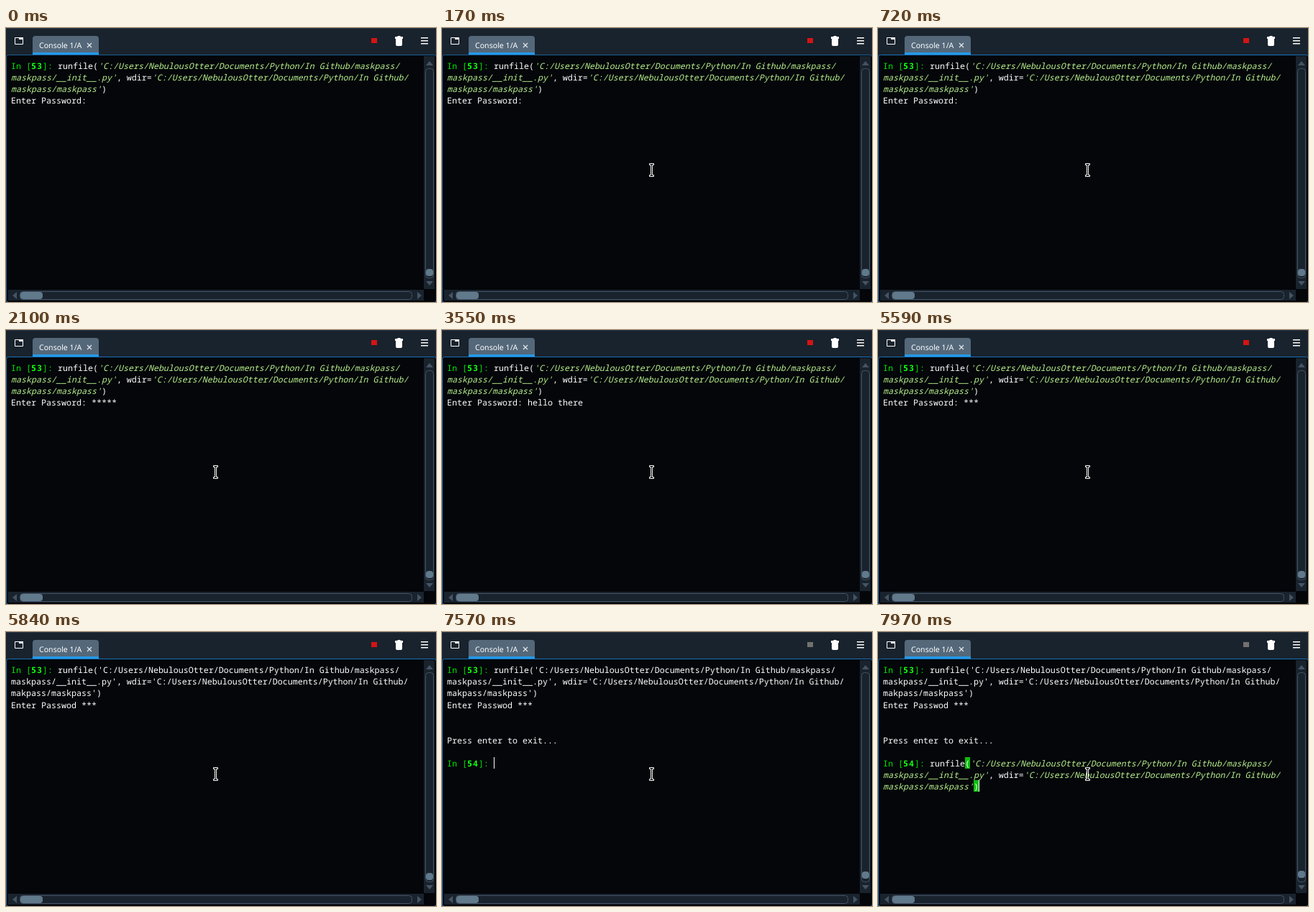
These frames come from a looping animation (598x381 px, 8000 ms). An HTML page:

```html
<!DOCTYPE html>
<html lang="en">
<head>
<meta charset="utf-8">
<title>Masked password console</title>
<style>
  html, body { margin: 0; width: 100%; height: 100%; overflow: hidden; background: #19232d; }
  svg { display: block; width: 598px; height: 381px; }
  text {
    font: 500 11.667px "Noto Sans Mono", "DejaVu Sans Mono", monospace;
    fill: #fff; white-space: pre; text-rendering: geometricPrecision;
  }
  .tab { font: 10.6px "Noto Sans", "Open Sans", sans-serif; }
  .in { fill: #00e600; }
  .num { fill: #1f1; font-weight: 700; letter-spacing: 1px; }
  .str { fill: var(--str, #fff); font-style: var(--slant, normal); }
  .lit { --str: #b8f08c; --slant: italic; }
  .bar { fill: #19232d; }
  .groove { fill: #19232d; stroke: #455364; }
  .arrow { fill: #455364; }
  .thumb { fill: #60798b; }

  /* One loop is 8000 ms, so 1% is 80 ms; every change is a hard step. */
  .a { animation: 8s step-end infinite; }
  #frame { animation-name: frame; }
  #first { animation-name: first; }
  #prompt { animation-name: prompt; }
  #mask { animation-name: mask; }
  #cover { animation-name: cover; }
  #clear { animation-name: clear; }
  #plain { animation-name: plain; }
  #broken { animation-name: broken; }
  #exit { animation-name: exit; }
  #next { animation-name: next; }
  #paste { animation-name: paste; }
  #caret { animation-name: caret; }
  #stop { animation-name: stop; }
  #thumb { animation-name: thumb; }
  #ring { animation-name: ring; }
  #mouse { animation-name: mouse; }

  @keyframes frame { 0% { stroke: #1b5f98; } 9%, 100% { stroke: #1a72bb; } }
  @keyframes first { 0% { opacity: 1; } 73%, 100% { opacity: 0; } }
  @keyframes prompt { 0% { opacity: 1; } 71.125%, 100% { opacity: 0; } }
  @keyframes mask {
    0%, 50.625%, 61.625% { opacity: 1; }
    44.375%, 57.5%, 71.125%, 100% { opacity: 0; }
  }
  @keyframes cover {
    0% { transform: none; }
    18.125% { transform: translateX(7px); }
    19.375% { transform: translateX(14px); }
    22.75% { transform: translateX(21px); }
    23.75% { transform: translateX(28px); }
    26.25% { transform: translateX(35px); }
    29.375% { transform: translateX(42px); }
    31.875% { transform: translateX(49px); }
    33.125% { transform: translateX(56px); }
    35% { transform: translateX(63px); }
    36.25% { transform: translateX(77px); }
    63.25% { transform: translateX(70px); }
    69.875%, 100% { transform: translateX(21px); }
  }
  @keyframes clear {
    0%, 50.625%, 61.625%, 100% { opacity: 0; }
    44.375%, 57.5% { opacity: 1; }
  }
  @keyframes plain { 0% { opacity: 0; } 73%, 100% { opacity: 1; } }
  @keyframes broken {
    0% { opacity: 0; transform: translateY(-1px); }
    71.125% { opacity: 1; transform: translateY(-1px); }
    73%, 100% { opacity: 1; transform: none; }
  }
  @keyframes exit { 0% { opacity: 0; } 85.375%, 100% { opacity: 1; } }
  @keyframes next { 0% { opacity: 0; } 94.625%, 100% { opacity: 1; } }
  @keyframes paste { 0% { opacity: 0; } 99.625%, 100% { opacity: 1; } }
  @keyframes caret {
    0%, 91.5% { opacity: 0; transform: none; }
    85.375% { opacity: 1; transform: translate(161px, 142px); }
    94.625% { opacity: 1; transform: translate(72px, 174px); }
    99.625%, 100% { opacity: 1; transform: translate(140px, 206px); }
  }
  @keyframes stop { 0% { fill: #d41414; } 94.625%, 100% { fill: #72716f; } }
  @keyframes thumb {
    0% { transform: none; }
    85.375% { transform: translateY(-1px); }
    94.625% { transform: translateY(-2px); }
    99.625%, 100% { transform: translateY(-3px); }
  }
  @keyframes ring { 0%, 9%, 100% { opacity: 0; } 6.875% { opacity: 1; } }
  @keyframes mouse {
    0% { opacity: 0; transform: translate(385px, 330px); }
    .5% { opacity: 1; transform: translate(385px, 330px); }
    1% { opacity: 1; transform: translate(341px, 270px); }
    1.625% { opacity: 1; transform: translate(304px, 217px); }
    2.125%, 100% { opacity: 1; transform: translate(291px, 197px); }
  }
</style>
</head>
<body>
<svg viewBox="0 0 598 381">
  <defs>
    <g id="call">
      <text x="72">runfile(<tspan class="str">'C:/Users/NebulousOtter/Documents/Python/In Github/maskpass/</tspan></text>
      <text x="7" y="16"><tspan class="str">maskpass/__init__.py'</tspan>, wdir=<tspan class="str">'C:/Users/NebulousOtter/Documents/Python/In Github/</tspan></text>
    </g>
    <text id="tail" x="7"><tspan class="str">maskpass/maskpass'</tspan>)</text>
  </defs>

  <!-- Toolbar -->
  <rect class="bar" width="598" height="381"/>
  <path d="M0 .5h598" stroke="#2a3843"/>
  <path d="M12.5 13.5h11v9h-11z" fill="none" stroke="#fff"/>
  <path d="M18 13h6v3h-6z" fill="#fff"/>
  <path d="M37 37V15q0-4 4-4h84q4 0 4 4v22z" fill="#54687a"/>
  <path d="M37 34h92v3H37z" fill="#259ae9"/>
  <text class="tab" x="46" y="28">Console 1/A</text>
  <path d="M113 21l6 6m0-6l-6 6" stroke="#e4e8eb" stroke-width="1.2"/>
  <rect id="stop" class="a" x="508" y="14" width="8" height="7"/>
  <path d="M541 13q0-1 1-1h2l1-1h3l1 1h2q1 0 1 1v2h-1v8q0 2-2 2h-5q-2 0-2-2v-8h-1z" fill="#fff"/>
  <path d="M577 13.750h10m-10 4h10m-10 4h10" stroke="#fff" stroke-width="1.5"/>

  <!-- Console pane and scroll bars; the right and bottom borders fall outside the stage -->
  <rect id="frame" class="a" x=".5" y="37.5" width="598" height="344" rx="3" fill="#04060a"/>
  <path class="bar" d="M581 39h15v324h-15zM3 364h578v15H3z"/>
  <rect class="groove" x="583.5" y="56.5" width="11" height="291" rx="4"/>
  <rect class="groove" x="19.5" y="366.5" width="545" height="11" rx="4"/>
  <path class="arrow" d="M584 52l5-6 5 6zM584 352l5 6 5-6zM15 367l-6 5 6 5zM572 367l6 5-6 5z"/>
  <rect id="thumb" class="a thumb" x="584" y="335" width="10" height="10" rx="4"/>
  <rect class="thumb" x="20" y="367" width="31" height="10" rx="4"/>

  <!-- Console text -->
  <text class="in" x="7" y="57">In [<tspan class="num" x="35">53</tspan><tspan x="51">]:</tspan></text>
  <g id="first" class="a lit">
    <use href="#call" y="57"/>
    <use href="#tail" y="89"/>
  </g>
  <text id="prompt" class="a" x="7" y="105">Enter Password:</text>
  <g id="mask" class="a">
    <text x="119" y="105">***********</text>
    <rect id="cover" class="a" x="119" y="94" width="90" height="13" fill="#04060a"/>
  </g>
  <text id="clear" class="a" x="119" y="105">hello there</text>

  <g id="plain" class="a">
    <use href="#call" y="57"/>
    <text x="7" y="89">makpass/maskpass')</text>
  </g>
  <text id="broken" class="a" x="7" y="106">Enter Passwod ***</text>
  <text id="exit" class="a" x="7" y="155">Press enter to exit...</text>

  <text id="next" class="a in" x="7" y="187">In [<tspan class="num" x="35">54</tspan><tspan x="51">]:</tspan></text>
  <g id="paste" class="a lit">
    <path d="M121 174h7v16h-7zM133 206h7v16h-7z" fill="#0bbe0b"/>
    <use href="#call" y="187"/>
    <use href="#tail" y="219"/>
  </g>
  <rect id="caret" class="a" width="1" height="16" fill="#fff"/>

  <!-- Pointer -->
  <circle id="ring" class="a" cx="291" cy="197" r="12" fill="#ff0" fill-opacity=".47"/>
  <path id="mouse" class="a" d="M-2.500 -8.500h6v2h-2v14h2v2h-6v-2h2v-14h-2z" fill="#000" stroke="#fff"/>
</svg>
</body>
</html>
```
